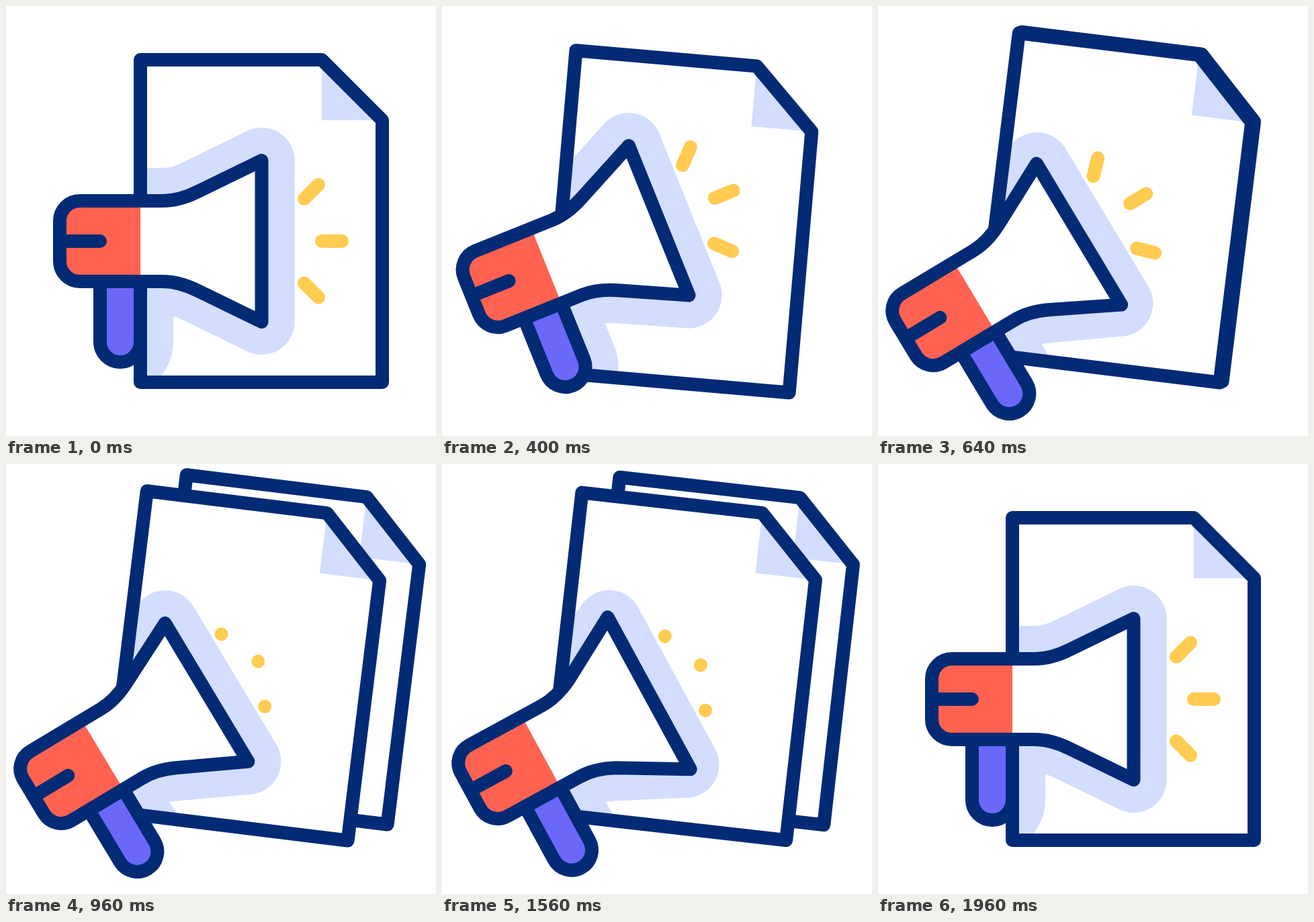
Recreate the animation shown at these times as an HTML page with a canvas. Size 640 by 640 pixels, loop 2000 ms.

```html
<!DOCTYPE html>
<html lang="en">
<head>
<meta charset="utf-8">
<title>Announcement</title>
<style>
  html, body { margin: 0; width: 100%; height: 100%; overflow: hidden; background: #fff; }
  canvas { display: block; width: 100vw; height: 100vh; }
</style>
</head>
<body>
<canvas id="stage" width="640" height="640"></canvas>
<script>
const ctx = document.getElementById('stage').getContext('2d');
const LOOP = 2000;
const NAVY = '#032b75', PALE = '#d3ddfe', RED = '#ff6251', PURPLE = '#6a67f9', YELLOW = '#ffcb50';

const page = new Path2D('M200 80H470L560 170V560H200Z');
const fold = new Path2D('M470 80V170H560Z');
const handle = new Path2D('M140 410V500a30 30 0 0 0 60 0V410Z');
const slot = new Path2D('M80 350H140');
const rearBand = new Path2D('M200 290H110a30 30 0 0 0-30 30V380a30 30 0 0 0 30 30H200Z');
const still = horn(0);

// Inner end and direction of each sound ray
const rays = [[444, 287, 21, -21], [470, 350, 30, 0], [444, 412.5, 21, 21]];

// Megaphone outline; d widens the mouth
function horn(d) {
  const x = 380.5 + d / 4;
  return new Path2D(`M${x} ${230 - d}L286 276C270 284 251 290 233 290H110
    a30 30 0 0 0-30 30V380a30 30 0 0 0 30 30H233C251 410 270 416 286 424L${x} ${470 + d}Z`);
}

function ease(t, from, to) {
  const k = Math.min(1, Math.max(0, (t - from) / (to - from)));
  return k * k * (3 - 2 * k);
}

// Rises over [from, to] and falls back over [back, end]
const hold = (t, from, to, back, end) => ease(t, from, to) - ease(t, back, end);

function pulse(t, start, length) {
  const mid = start + length / 2;
  return hold(t, start, mid, mid, start + length);
}

// Turns about (px, py) while sliding along a bowed path
function place(p, px, py, degrees, dx, dy, bowX, bowY) {
  const bow = 4 * p * (1 - p);
  ctx.translate(px + dx * p + bowX * bow, py + dy * p + bowY * bow);
  ctx.rotate(degrees * p * Math.PI / 180);
  ctx.translate(-px, -py);
}

function fill(path, color) {
  ctx.fillStyle = color;
  ctx.fill(path);
}

function line(path, color = NAVY, width = 20) {
  ctx.strokeStyle = color;
  ctx.lineWidth = width;
  ctx.stroke(path);
}

function layer(paint) {
  ctx.save();
  paint();
  ctx.restore();
}

function drawPage() {
  fill(page, '#fff');
  fill(fold, PALE);
}

function draw(t) {
  const tilt = hold(t, 80, 580, 1490, 1902);
  const slide = hold(t, 600, 860, 1500, 1950);
  const ray = 1 - hold(t, 600, 860, 1540, 1900);
  const widen = 12 * (pulse(t, 600, 280) + pulse(t, 960, 360) + pulse(t, 1320, 360));
  const leaving = t < 1000;

  const pageBow = leaving ? [-8.8, 17.8] : [-2, -2.3];
  const hornBow = leaving ? [-5.3, -26.7] : [-1.5, 7];
  const atPage = () => place(tilt, 380, 320, 7, -20.8, -19.6, ...pageBow);
  const atHorn = () => place(tilt, 220, 350, -31, -59, 72.6, ...hornBow);

  ctx.fillStyle = '#fff';
  ctx.fillRect(0, 0, 640, 640);
  ctx.lineJoin = ctx.lineCap = 'round';

  if (slide > 0) layer(() => {
    ctx.translate(59 * slide, -24 * slide);
    atPage();
    drawPage();
    line(page);
  });

  layer(() => {
    atPage();
    drawPage();
    ctx.clip(page);
    ctx.setTransform(1, 0, 0, 1, 0, 0);
    atHorn();
    line(still, PALE, 98);
    line(handle, PALE, 98);
    fill(still, PALE);
  });

  layer(() => {
    atPage();
    line(page);
  });

  layer(() => {
    atHorn();
    fill(handle, PURPLE);
    line(handle);
    const body = horn(widen);
    fill(body, '#fff');
    fill(rearBand, RED);
    line(body);
    line(slot);
    for (const [x, y, dx, dy] of rays) {
      const end = Math.max(ray, 0.001);
      line(new Path2D(`M${x} ${y}L${x + dx * end} ${y + dy * end}`), YELLOW);
    }
  });
}

const start = performance.now();
function tick() {
  draw((performance.now() - start) % LOOP);
  requestAnimationFrame(tick);
}
tick();
</script>
</body>
</html>
```
